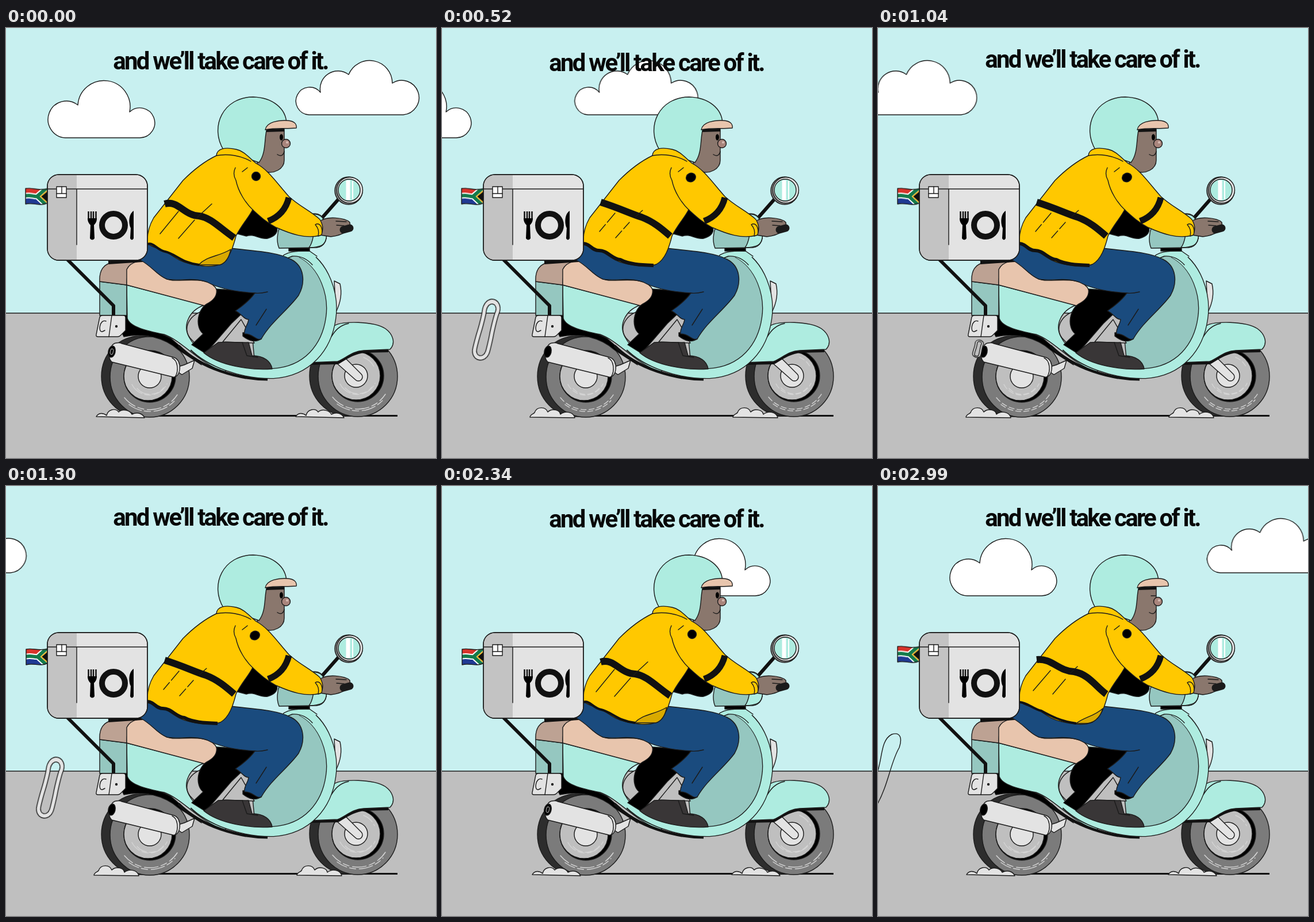
Write an HTML page without scripts that moves like this. It is 748x748 px and loops after 3120 ms.

```html
<!DOCTYPE html>
<html lang="en">
<head>
<meta charset="utf-8">
<title>Scooter delivery</title>
<style>
html, body { margin: 0; width: 100%; height: 100%; overflow: hidden; background: #c8f0f0 }
svg { display: block; width: 100vw; height: 100vh }
.ink { stroke: #1b1b1b; stroke-width: 1.4; stroke-linejoin: round; stroke-linecap: round; fill: none }
.mint { fill: #aeece0 } .teal { fill: #95c7c0 } .yellow { fill: #ffc800 } .gold { fill: #d9aa00 }
.blue { fill: #1a4b7e } .peach { fill: #e8c5ad } .tan { fill: #bda293 } .skin { fill: #8a776d }
.light { fill: #e3e3e3 } .grey { fill: #bfbfbf } .tyre { fill: #7b7b7b } .black { fill: #000 } .white { fill: #fff }
.flat { stroke: none }
.thick { stroke: #111; fill: none; stroke-linecap: butt }
.title { font: 700 42px Roboto, sans-serif; letter-spacing: -2.8px; text-anchor: middle; fill: #080808 }

.cloud { animation: drift 3120ms steps(24) infinite }
@keyframes drift { to { transform: translateX(var(--travel)) } }

.bob { animation: bob 1560ms step-end infinite }
@keyframes bob {
  0%, 50% { transform: none }
  8.33%, 41.66% { transform: translateY(1.85px) }
  16.66%, 33.33% { transform: translateY(3.2px) }
  25% { transform: translateY(3.7px) }
  58.33%, 91.66% { transform: translateY(-1.85px) }
  66.66%, 83.33% { transform: translateY(-3.2px) }
  75% { transform: translateY(-3.7px) }
}

.wavy, .eased, .straight, .puff, .thin { animation: 780ms step-end infinite }
.wavy { animation-name: wavy }
.eased { animation-name: eased }
.straight { animation-name: straight }
@keyframes wavy { 0% { visibility: visible } 16.66%, to { visibility: hidden } }
@keyframes eased { 0%, 33.33% { visibility: hidden } 16.66%, 83.33%, to { visibility: visible } }
@keyframes straight { 0%, 83.33%, to { visibility: hidden } 33.33% { visibility: visible } }

.puff { animation-name: puff }
@keyframes puff {
  0%, 83.33%, to { visibility: hidden }
  16.66% { visibility: visible; transform: translate(180px, 561px) rotate(14deg) scale(.4, .22) }
  33.33% { visibility: visible; transform: translate(174px, 558px) rotate(14deg) scale(.48, .28) }
  50% { visibility: visible; transform: translate(134px, 545px) rotate(14deg) scale(.75, .6) }
  66.66% { visibility: visible; transform: translate(77px, 525px) rotate(14deg) }
}
.puff path { vector-effect: non-scaling-stroke }
.thin { animation-name: thin }
@keyframes thin { 0% { visibility: hidden } 83.33%, to { visibility: visible } }

.tread { stroke: #d4d4d4; stroke-dasharray: 24 5 11 6; animation: tread 780ms step-end infinite }
@keyframes tread {
  16.66%, 83.33% { stroke-dasharray: 9 5 }
  33.33% { stroke-dasharray: 24 5 11 6; stroke-dashoffset: 5px }
}

.flag { transform-origin: 72px 296px; animation: flap 520ms step-end infinite }
@keyframes flap { 0%, 75% { transform: translate(-1px, -3.5px) skewY(2deg) } 25% { transform: none } }

.open { animation: open 3120ms step-end infinite }
.shut { animation: shut 3120ms step-end infinite }
@keyframes open { 95.83%, to { visibility: hidden } }
@keyframes shut { 0% { visibility: hidden } 95.83%, to { visibility: visible } }
</style>
</head>
<body>
<svg viewBox="0 0 748 748">
<defs>
  <path id="low-cloud" d="M103 191A32 32 0 1 1 125 134A45.5 45.5 0 1 1 215 146A26 26 0 1 1 233 191Z"/>
  <path id="high-cloud" d="M527 151A24 24 0 1 1 547 112A31 31 0 0 1 596 81A39.5 39.5 0 0 1 672 96A30 30 0 1 1 691 151Z"/>
  <clipPath id="cloth"><path d="M35 284C47 281 57 288 73 283V308C59 315 48 307 35 311Z"/></clipPath>
  <g id="wheel">
    <ellipse cx="-17" cy="-1" rx="67" ry="70" fill="#2d2d2d"/>
    <ellipse rx="69" ry="70" class="tyre"/>
    <circle r="45" class="black" cy="-1"/>
    <circle cx="-3" cy="-1" r="42" class="grey"/>
    <path class="tread" d="M-44 36A57 57 0 0 0 48 31M-36 48A60 60 0 0 0 44 41M-31 13A34 34 0 0 0 30 12M-22 20A30 30 0 0 0 24 19M10 -33A34 34 0 0 1 29 -15"/>
  </g>
  <path id="dust-a" d="M157 676C161 669 169 669 175 674C177 664 190 660 196 668C204 661 216 666 219 672C229 667 238 671 241 678Z"/>
  <path id="dust-b" d="M153 677C154 671 159 672 161 669C165 658 180 658 184 668C191 661 205 664 206 672C215 665 229 668 231 678Z"/>
</defs>

<rect width="748" height="748" fill="#c8f0f0"/>
<rect y="496" width="748" height="252" class="grey"/>
<g class="ink">
  <path d="M0 496H748"/>
  <g class="cloud white" style="--travel:-1248px"><use href="#low-cloud"/><use href="#low-cloud" x="1248"/></g>
  <g class="cloud white" style="--travel:-1640px"><use href="#high-cloud"/><use href="#high-cloud" x="1640"/></g>
</g>

<g class="ink">
  <path class="thick" style="stroke-width:3" d="M180 674.5H681"/>

  <!-- wheels and exhaust -->
  <use href="#wheel" x="250" y="607"/>
  <circle cx="250" cy="606" r="20" class="light"/>
  <use href="#wheel" x="612" y="606"/>
  <circle cx="609" cy="605" r="20" class="light"/>
  <path class="light" d="M573 581L586 570L618 602A7 7 0 0 1 608 612Z"/>
  <path class="light" d="M290 592L310 586L328 578L324 592L306 603Z"/>
  <path class="light" d="M191 548C181 549 175 573 184 581L290 607C304 610 308 578 292 573L202 549C198 547 195 547 191 548Z"/>
  <path d="M289 574C299 578 301 597 294 607"/>
  <ellipse cx="184" cy="563" rx="6" ry="10" class="black" transform="rotate(12 184 563)"/>
  <ellipse cx="184" cy="563" rx="2.5" ry="5" class="wavy" style="stroke:#8b8b8b" transform="rotate(12 184 563)"/>

  <!-- front fender -->
  <path class="thick" style="stroke-width:6" d="M529 583L577 582C592 573 604 564 624 562L665 561"/>
  <path class="mint" d="M528 582C546 566 552 537 571 518C583 509 641 510 660 523C674 533 678 549 668 559L622 561C602 562 592 574 577 580Z"/>
  <path d="M566 537C572 527 580 517 596 514"/>

  <!-- body -->
  <path class="black" d="M186 497H211C222 522 260 525 287 540L340 586L300 560C275 538 240 530 205 537Z"/>
  <path class="light" d="M571 440L581 445C585 462 581 480 574 494Z"/>
  <path class="teal" d="M478 407C478 394 495 388 516 389C556 414 570 460 560 512C548 562 505 594 450 597L425 560Z"/>
  <path class="grey" d="M352 490C318 496 307 522 320 539L338 558L432 575L425 500Z"/>
  <path class="mint" d="M210 447L345 482C319 491 307 516 318 537C329 559 360 580 388 590L380 599C332 580 308 545 275 533C245 527 215 520 211 505Z"/>
  <path class="thick" style="stroke-width:5" d="M300 553C340 593 405 611 455 611"/>
  <path style="stroke-width:18.6;stroke-linecap:butt" d="M514 391C555 412 571 465 565 505C558 555 525 597 465 601C410 602 355 581 327 554"/>
  <path style="stroke-width:16;stroke:#aeece0;stroke-linecap:butt" d="M513 391C555 412 571 465 565 505C558 555 525 597 465 601C410 602 355 581 326 552"/>
  <path class="mint flat" d="M478 405C478 393 494 387 528 388L540 396L533 410C523 400 511 396 498 397Z"/>
  <path d="M541 397L528 388C494 387 478 393 478 405L498 397C512 396 524 402 533 412"/>
  <path class="teal" d="M163 441L210 447V500H163Z"/>
  <path class="tan" d="M163 441C162 424 168 408 190 408L240 404C222 406 210 412 210 447Z"/>
  <path class="peach" d="M210 447V420C217 405 240 402 250 410C260 425 275 438 290 439C315 440 350 433 364 451C373 463 362 478 345 483Z"/>
  <path class="thick" style="stroke-width:6" d="M178 408L238 404"/>

  <!-- legs -->
  <path class="black" d="M366 454L434 459L410 497L392 514L347 566L323 551L343 532C328 520 333 488 351 479C362 473 368 465 366 454Z"/>
  <path class="grey" d="M377 546L409 507L432 548Z"/>
  <path fill="#393637" d="M344 565L369 547C388 545 405 548 422 547L428 570C449 570 461 580 463 593C425 596 370 587 344 565Z"/>
  <path d="M411 547L419 570L438 573"/>
  <path class="black" d="M412 530C425 529 432 535 444 541C433 548 421 543 412 536Z"/>
  <path class="blue" d="M234 404L248 370L390 383C430 388 470 389 495 402C520 414 521 443 509 465C491 490 461 511 444 541C434 544 430 532 415 532C413 524 421 516 422 507C413 507 410 497 399 492C412 483 425 472 433 461C400 459 370 453 350 442C325 433 300 441 280 437C262 430 255 415 234 404Z"/>
  <path d="M432 461C440 462 447 461 455 459M435 517L453 489"/>

  <!-- handlebar and mirror -->
  <path class="black" d="M399 357C406 335 420 321 435 312L470 344C475 354 469 362 455 366C440 368 432 357 418 362Z"/>
  <path class="thick" style="stroke-width:6" d="M550 330L579 297"/>
  <path class="teal" d="M476 346L535 323C552 321 560 340 557 366C555 377 549 381 540 382L475 383C470 371 472 356 476 346Z"/>
  <path class="mint" d="M534 324C552 322 560 340 557 366C555 377 549 381 527 382C535 372 537 350 534 324Z"/>
  <path class="black" d="M492 383H528V388H492Z"/>
  <circle cx="596" cy="283" r="24" fill="#777"/>
  <circle cx="598" cy="282" r="22.5" class="light"/>
  <circle cx="597" cy="282" r="19" class="mint"/>
  <path style="stroke:#fff;stroke-width:7;stroke-linecap:butt" d="M595 265V299"/>
  <path style="stroke:#fff;stroke-width:2;stroke-linecap:butt" d="M603 266V298"/>
  <path class="skin" d="M545 337C557 326 590 330 598 338C602 351 585 361 565 363L546 360Z"/>
  <path d="M574 336L592 337M575 343L588 344"/>
  <path style="stroke-width:13" d="M587 351L598 348"/>

  <!-- head -->
  <path class="skin" d="M450 178L484 176V230C484 246 465 254 452 250C443 246 436 240 437 231C450 218 451 195 450 178Z"/>
  <path class="thick" style="stroke-width:5" d="M452 178.500L484 177.500"/>
  <circle cx="487" cy="201" r="7.500" fill="#a9857c"/>
  <circle cx="489" cy="199" r="2" fill="#d9bdb5" class="flat"/>
  <ellipse cx="479" cy="190" rx="3" ry="5.500" class="black flat open"/>
  <path class="shut" d="M475 191H483"/>
  <path d="M472 220C478 224 482 222 484 215"/>
  <path class="mint" d="M379 213C353 172 378 120 430 120C464 121 487 140 488 166L455 171C448 190 454 216 440 234L420 227C405 212 390 212 379 213Z"/>
  <path class="peach" d="M451 177C453 163 475 160 490 161C503 162 506 168 505 174C485 176 470 173 451 177Z"/>

  <!-- jacket -->
  <path class="yellow" d="M366 222C367 209 382 207 400 211C415 214 425 228 436 236C455 246 470 268 492 293C510 310 530 318 546 333C553 345 552 355 546 361C520 367 495 358 470 347C450 336 440 326 429 316C422 330 408 345 400 362C395 382 388 403 373 411C355 418 335 413 320 410C300 406 290 396 280 390C270 384 252 382 246 374C245 358 250 342 257 330C275 307 290 288 308 265C325 248 345 232 366 222Z"/>
  <path class="yellow" d="M538 342C546 337 552 348 549 360L543 362C545 353 543 348 538 342Z"/>
  <path class="thick" style="stroke-width:11" d="M456 336C474 329 487 316 492 295"/>
  <path d="M366 222C385 218 410 222 426 232M399 243C395 251 396 258 400 265C404 285 417 305 430 317M411 250L420 243"/>
  <g class="wavy">
    <path class="gold" d="M335 412C350 396 370 398 391 385C388 400 382 409 372 412Z"/>
    <path class="thick" style="stroke-width:12" d="M276 306C300 299 309 326 336 327C357 330 373 349 397 365"/>
    <path class="thick" style="stroke-width:4" d="M246 376C257 372 263 387 277 389C295 393 306 409 336 412"/>
    <path d="M268 358L300 319M300 366L328 334M333 329L358 306"/>
    <circle cx="435" cy="258" r="7.500" class="black"/>
  </g>
  <g class="eased">
    <path class="gold" d="M345 413C358 402 376 401 391 387C386 405 374 413 360 413Z"/>
    <path class="thick" style="stroke-width:12" d="M276 302C302 299 314 322 341 323C366 327 380 350 397 362"/>
    <path class="thick" style="stroke-width:4" d="M246 376C259 376 270 388 284 391C302 401 318 409 345 413"/>
    <path d="M270 356L300 321M304 362L326 336M334 326L347 314"/>
    <circle cx="433" cy="257" r="7.500" class="black"/>
  </g>
  <g class="straight">
    <path class="thick" style="stroke-width:12" d="M276 303C308 313 330 324 347 329C368 337 382 349 397 362"/>
    <path class="thick" style="stroke-width:6" d="M246 375C258 375 260 387 273 387C288 387 296 402 310 403C325 411 345 412 368 413"/>
    <path stroke-dasharray="16 5 24 4" d="M274 354L301 322M302 365L326 338M337 328L349 317"/>
    <ellipse cx="433" cy="260" rx="8.500" ry="7.500" class="black" transform="rotate(-25 433 260)"/>
  </g>

  <!-- delivery box -->
  <g class="flag">
    <g clip-path="url(#cloth)" class="flat">
      <path fill="#d8342b" d="M33 276H75V297H33Z"/>
      <path fill="#203a94" d="M33 297H75V318H33Z"/>
      <path fill="none" stroke="#fff" stroke-width="10" d="M33 297C44 294 49 298 55 297L76 278M55 297L76 316"/>
      <path fill="none" stroke="#147a4b" stroke-width="6" d="M33 297C44 294 49 298 55 297L76 278M55 297L76 316"/>
      <path fill="#111" stroke="#e8b52c" stroke-width="2" d="M61 297L76 284V310Z"/>
    </g>
    <path d="M73 283C57 288 47 281 35 284V311C48 307 59 315 73 308"/>
  </g>
  <path class="thick" style="stroke-width:6" d="M107 403L187 483V505"/>
  <path class="light" d="M163 503Q164 500 168 500L204 500Q208 500 208 504V526L199 535Q197 537 194 537H160Q156 537 157 533Z"/>
  <path d="M184 500L179 537M174 510C163 505 159 531 168 528L172 526"/>
  <circle cx="192" cy="519" r="1.500" class="black"/>
  <rect x="72" y="255" width="174" height="149" rx="20" class="light"/>
  <path fill="#c3c3c3" class="flat" d="M123 256V403H92Q73 403 73 384V275Q73 256 92 256Z"/>
  <path d="M73 280H246M123 280V377"/>
  <rect x="72" y="255" width="174" height="149" rx="20"/>
  <path class="white" d="M88 276H105V295H88Z"/>
  <path d="M88 288H105M97 276V288"/>
  <g class="thick">
    <circle cx="187" cy="343" r="20" style="stroke-width:10"/>
    <path style="stroke-width:2.500" d="M143.500 319V333M148 319V333M152 319V333M156.500 319V333"/>
    <path class="black flat" d="M142 331H158C158 339 154 341 153 343L154 366Q150 371 146 366L147 343C146 341 142 339 142 331Z"/>
    <path class="black flat" d="M222 318V366Q219 371 216 366L217 348C213 340 213 324 222 318Z"/>
  </g>

  <!-- dust and exhaust puff -->
  <g class="light wavy"><use href="#dust-a"/><use href="#dust-a" x="347"/></g>
  <g class="light eased"><use href="#dust-a" x="-3"/><use href="#dust-a" x="348"/></g>
  <g class="light straight"><use href="#dust-b"/><use href="#dust-b" x="353"/></g>
  <g class="puff">
    <path class="light" fill-rule="evenodd" d="M-15 -34C-15 -62 15 -60 15 -36C12 -12 16 14 15 36C14 60 -15 60 -15 36C-16 12 -12 -10 -15 -34ZM-8 -34C-8 -50 8 -50 8 -36C5 -12 9 14 8 36C7 50 -8 50 -8 36C-9 12 -5 -10 -8 -34Z"/>
  </g>
  <path class="thin" d="M-2 500C8 475 4 442 24 432C40 427 42 440 37 455C22 480 18 520 -2 555"/>
</g>

<text class="title bob" x="373" y="72">and we’ll take care of it.</text>
</svg>
</body>
</html>
```
